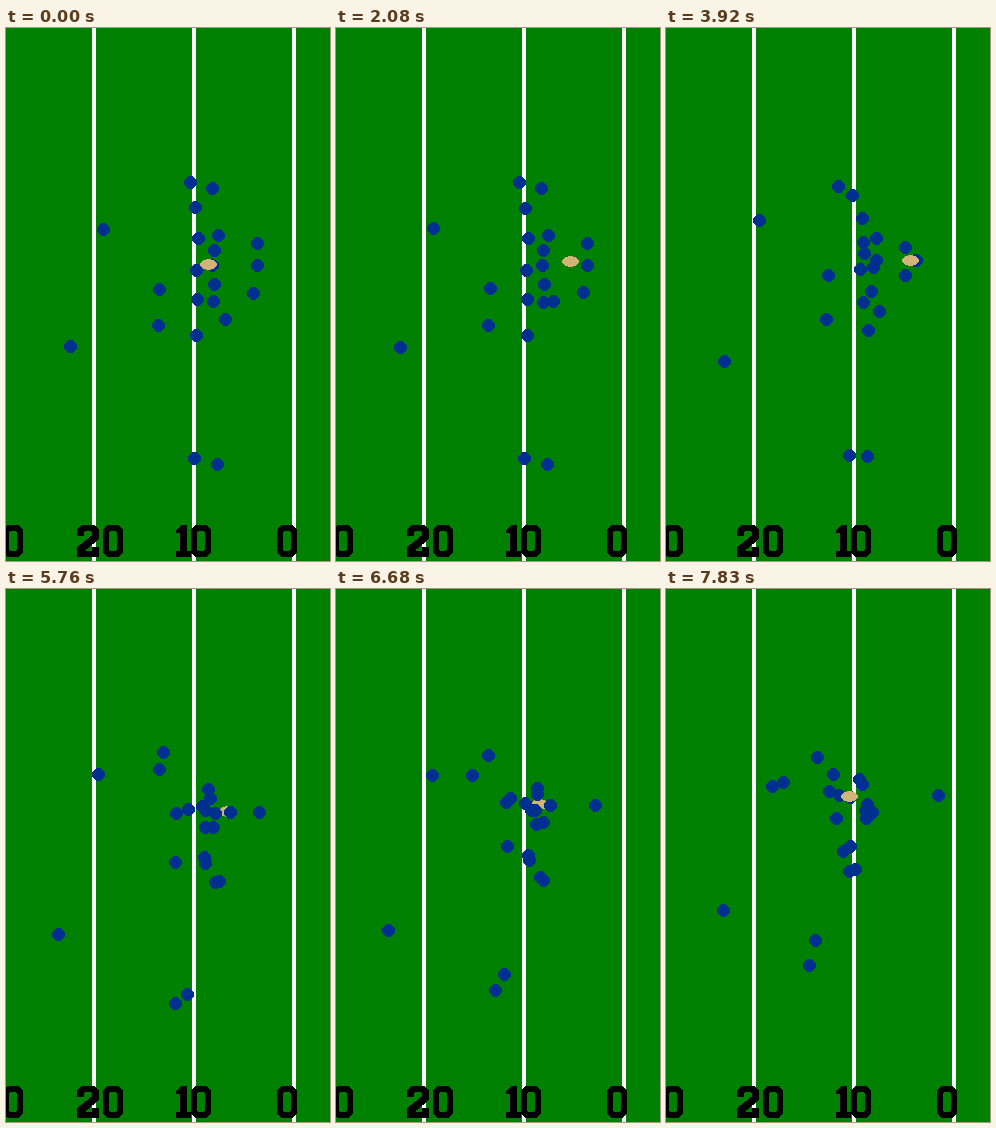
These frames come from a looping animation (324 px wide and 533 px high, 8 s). A matplotlib script:

```python
import numpy as np
import matplotlib.pyplot as plt
from matplotlib.animation import FuncAnimation
from matplotlib.patches import Ellipse, Polygon, Rectangle

W, H, DPI = 324, 533, 64
TICK, LOOP = 20, 8000
GREEN, BLUE, TAN = "#008000", "#00308f", "#d2b478"
STEP, LEAD = 230, 10     # the picture moves on once per step, after a short lead
PLAY = (1600, 7830)      # most players stand still, then move until the end

fig = plt.figure(figsize=(W / DPI, H / DPI), dpi=DPI, facecolor=GREEN)
ax = fig.add_axes([0, 0, 1, 1])
ax.set_xlim(0, W)
ax.set_ylim(H, 0)
ax.axis("off")


def put(patch):
    patch.set_antialiased(False)
    patch.set_linewidth(0)
    return ax.add_patch(patch)


def shape(points, x, y, color="black"):
    return put(Polygon(np.array(points) + (x, y), fc=color, zorder=2))


def octagon(x0, y0, x1, y1, c):
    return np.array([(x0 + c, y0), (x1 - c, y0), (x1, y0 + c), (x1, y1 - c),
                     (x1 - c, y1), (x0 + c, y1), (x0, y1 - c), (x0, y0 + c)])


def zero(x, y=497):
    shape(octagon(0, 0, 20, 32, 5), x, y)
    shape(octagon(6, 6, 14, 26, 2), x, y, GREEN)


def one(x, y=497):
    shape([(0, 6), (6, 0), (11, 0), (11, 26), (15, 26), (15, 32), (0, 32),
           (0, 26), (4, 26), (4, 8), (0, 8)], x, y)


def two(x, y=497):
    shape([(0, 5), (5, 0), (17, 0), (22, 5), (22, 13), (9, 24), (9, 26), (15, 26),
           (15, 22), (22, 22), (22, 32), (0, 32), (0, 23), (15, 11), (15, 7),
           (14, 6), (8, 6), (7, 7), (7, 11), (0, 11)], x, y)


def run(t, start, end, bend=(0, 0), span=PLAY):
    """Leave start from rest, swing out by bend on the way, arrive at end."""
    s = np.clip((t - span[0]) / (span[1] - span[0]), 0, 1)
    start, end, bend = map(np.array, (start, end, bend))
    return start + (end - start) * s**2 * (2 - s) + bend * 6.75 * s**2 * (1 - s)


def pixel(p):
    return np.round(p) + 0.5


DISC = octagon(-6.4, -6.4, 6.4, 6.4, 5)
players = []


def player(*route, **timing):
    dot = put(Polygon(DISC, fc=BLUE, zorder=4))
    players.append((dot, route, timing))


for x in (86, 186, 286):
    put(Rectangle((x, 0), 4, H, fc="white", zorder=1))
zero(-3)
two(71)
zero(97)
one(170)
zero(185)
zero(271)

# upper side of the field: start, end, bend
player((184, 154), (151, 168), (-7, 1))
player((206, 160), (117, 193))
player((189, 179), (193, 190), (11, 14))
player((97, 201), (106, 197), (-10, -14))
# the pack
player((192, 210), (173, 206), (15, 9))
player((212, 207), (196, 195), (2, 9))
player((208, 222), (167, 185), (-2, 20))
player((190, 242), (200, 229), (3, 4))
player((206, 237), (206, 223), (1, 9))
player((208, 256), (184, 257), (4, 11))
player((191, 271), (177, 262), (16, 8))
player((207, 273), (189, 280), (17, 15))
player((190, 307), (183, 282), (23, 1))
player((219, 291), (199, 221), (4, -14), span=(600, 5300))
# right side, the ball carrier first
player((251, 215), (184, 208), (-6, 13), span=(2300, 7830))
player((251, 237), (272, 206), (-10, 4))
player((247, 265), (201, 215), (4, -12))
# left side
player((153, 261), (163, 202), (11, -2))
player((152, 297), (170, 229), (6, 16))
player((64, 318), (57, 321), (-8, 25))
# deep pair
player((188, 430), (143, 376), (8, 16))
player((211, 436), (149, 351), (7, 19))

ball = put(Ellipse((0, 0), 15.2, 9.6, fc=TAN))


def ball_at(t):
    """A straight pass to the right, then carried back."""
    u = np.clip((t - 900) / 1600, 0, 1)
    caught = np.array((202, 236)) + u * np.array((43, -4))
    return run(t, caught, (183, 207), span=(3600, 7830))


def draw(n):
    t = n * TICK + TICK / 2
    k = (t - LEAD) // STEP
    t = k * STEP + LEAD
    for dot, route, timing in players:
        dot.set_xy(DISC + pixel(run(t, *route, **timing)))
    ball.set_center(pixel(ball_at(t)))
    covered = 2600 < t < 3500 or 4600 < t < 7200
    ball.set_zorder(3 if covered else 5)
    return [p[0] for p in players] + [ball]


anim = FuncAnimation(fig, draw, frames=LOOP // TICK, interval=TICK,
                     repeat=True, repeat_delay=0, blit=False)
plt.show()
```
